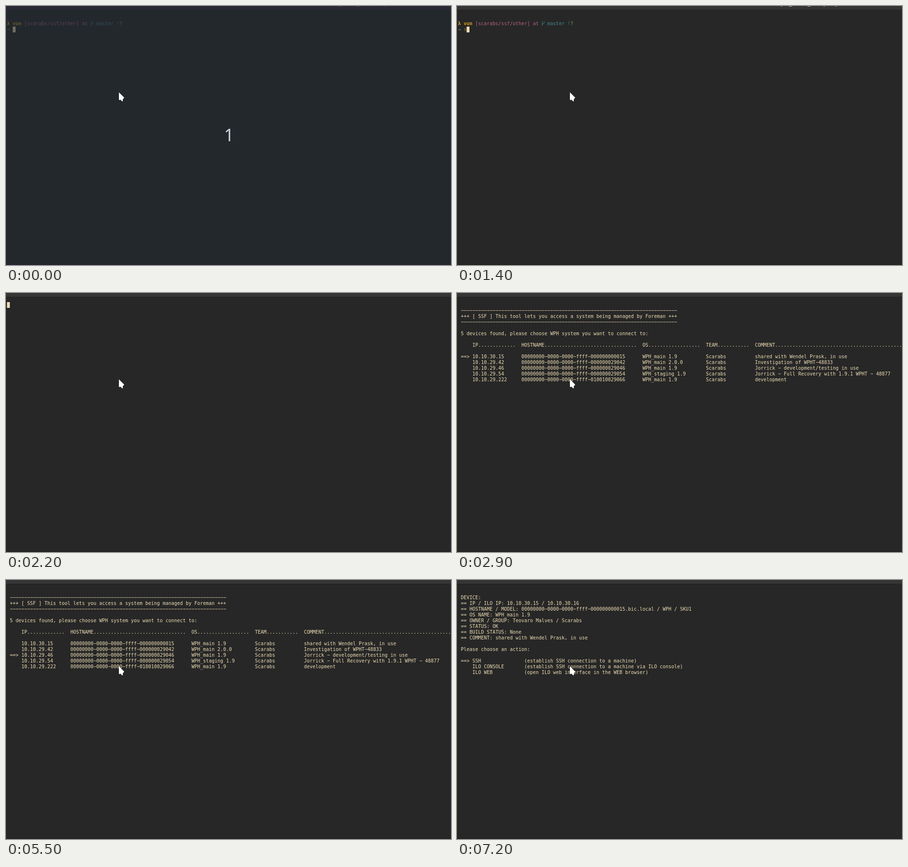
These frames come from a looping animation (926x540 px, 8 s). An HTML page:

```html
<!DOCTYPE html>
<html lang="en">
<head>
<meta charset="utf-8">
<title>Terminal session</title>
<style>
html, body { margin: 0; width: 100%; height: 100%; overflow: hidden; background: #272727; }
svg { display: block; width: 926px; height: 540px; }
text {
  font: 10px "DejaVu Sans Mono", monospace;
  white-space: pre;
  fill: #ebdbb2;
}
.gold { fill: #d79921; font-weight: bold; }
.purple { fill: #b16286; }
.blue { fill: #458588; }
.aqua { fill: #689d6a; }
.typed { fill: #88703a; }
.count { font: 36px "Noto Sans", sans-serif; fill: #cbd8da; text-anchor: middle; }

/* Every part shares one 8 s clock with hard changes. */
.part { animation: 8s step-end infinite; }
#fade { animation-name: fade; }
#title { animation-name: title; }
#shell { animation-name: shell; }
#cursor { animation-name: cursor; }
#list { animation-name: list; }
#device { animation-name: device; }
#arrow { animation-name: arrow; }
#key1 { animation-name: key1; }
#key2 { animation-name: key2; }
#key3 { animation-name: key3; }

@keyframes fade { 0% { opacity: 1 } 1.25%, 100% { opacity: 0 } }
@keyframes title { 0% { opacity: 1 } 25%, 100% { opacity: 0 } }
@keyframes shell { 0% { opacity: 1 } 27.5%, 100% { opacity: 0 } }
@keyframes list { 0% { opacity: 0 } 36.25% { opacity: 1 } 90%, 100% { opacity: 0 } }
@keyframes device { 0% { opacity: 0 } 90%, 100% { opacity: 1 } }
@keyframes key1 { 0% { opacity: 0 } 17.5%, 100% { opacity: 1 } }
@keyframes key2 { 0% { opacity: 0 } 20%, 100% { opacity: 1 } }
@keyframes key3 { 0% { opacity: 0 } 23.75%, 100% { opacity: 1 } }
@keyframes cursor {
  0% { transform: translate(14px, 43px); opacity: 1 }
  17.5% { transform: translate(20px, 43px); opacity: 1 }
  20% { transform: translate(26px, 43px); opacity: 1 }
  23.75% { transform: translate(32px, 43px); opacity: 1 }
  25% { transform: translate(2px, 55px); opacity: 1 }
  27.5% { transform: translate(2px, 19px); opacity: 1 }
  36.25%, 100% { transform: translate(2px, 19px); opacity: 0 }
}
@keyframes arrow {
  0% { transform: translateY(0) }
  60% { transform: translateY(48px) }
  62.5% { transform: translateY(36px) }
  63.75% { transform: translateY(24px) }
  66.25% { transform: translateY(12px) }
  68.75% { transform: translateY(24px) }
  71.25% { transform: translateY(36px) }
  72.5% { transform: translateY(48px) }
  75%, 100% { transform: translateY(0) }
}
</style>
</head>
<body>
<svg viewBox="0 0 926 540">
  <rect width="926" height="540" fill="#272727"/>
  <rect width="926" height="8" fill="#353535"/>
  <rect y="8" width="926" height="1" fill="#1f1f1f"/>
  <rect y="538" width="926" height="2" fill="#212121"/>

  <!-- lower edge of the cropped window title -->
  <path id="title" class="part" fill="none" stroke="#dedede" stroke-width="1.6"
    d="M673 -1L676 .5M689 -1Q694 1.5 699 -1M728 -1Q732 1.5 737 -1M762 -1L765 .5M791 -1L788 .5"/>

  <g id="shell" class="part">
    <path d="M177.5 32V41M181.5 32V35L178 38" fill="none" stroke="#458588"/>
  </g>
  <rect id="cursor" class="part" width="6" height="12" fill="#ebdbb2"/>

  <g id="list" class="part"><g id="arrow" class="part"></g></g>
  <g id="device" class="part"></g>

  <g id="fade" class="part">
    <rect width="926" height="540" fill="#232a33" opacity=".62"/>
    <path d="M0 0H926V8H0ZM0 538H926V540H0Z" fill="#30203c" opacity=".3"/>
    <text class="count" x="464" y="282">1</text>
  </g>
  <path d="M235 180V196L238.5 195.5L242 199L243 198.5V194.5L246 191Z" fill="#fff"/>
</svg>
<script>
const svgNS = "http://www.w3.org/2000/svg";
const cellWidth = 6, rowHeight = 12, firstBaseline = 40;

// Prints on the terminal grid: one glyph per cell, with the wide dash.
function print(parent, string, x, row, className = "") {
  const text = document.createElementNS(svgNS, "text");
  text.setAttribute("class", className);
  text.setAttribute("x", [...string].map((_, i) => x + cellWidth * i).join(" "));
  text.setAttribute("y", firstBaseline + rowHeight * row);
  text.textContent = string.replaceAll("-", "−");
  document.getElementById(parent).append(text);
  return text;
}

const printLines = (parent, lines) =>
  lines.forEach((line, row) => line && print(parent, line, 8, row));

print("shell", "λ vun", 2, 0, "gold");
print("shell", "[scarabs/ssf/other] at", 38, 0, "purple");
print("shell", "master !", 188, 0, "blue");
print("shell", "?", 236, 0, "aqua");
print("shell", "→", 2, 1, "aqua");
[..."ssf"].forEach((key, i) => {
  print("shell", key, 14 + cellWidth * i, 1, "typed part").id = "key" + (i + 1);
});
print("arrow", "==>", 8, 8);

const widths = [15, 40, 20, 15, 52];
const row = (cells, pad = " ") =>
  "    " + cells.map((cell, i) => cell.padEnd(widths[i], pad)).join("  ");
const device = (ip, id, os, comment) =>
  row([ip, "00000000-0000-0000-ffff-" + id, os, "Scarabs", comment]);
const rule = "-".repeat(75);

printLines("list", [
  rule,
  "+++ [ SSF ] This tool lets you access a system being managed by Foreman +++",
  rule,
  "",
  "5 devices found, please choose WPH system you want to connect to:",
  "",
  row(["IP", "HOSTNAME", "OS", "TEAM", "COMMENT"], "."),
  "",
  device("10.10.30.15", "000000000015", "WPH_main 1.9", "shared with Wendel Prask, in use"),
  device("10.10.29.42", "000000029042", "WPH_main 2.0.0", "Investigation of WPHT-48833"),
  device("10.10.29.46", "000000029046", "WPH_main 1.9", "Jorrick - development/testing in use"),
  device("10.10.29.54", "000000029054", "WPH_staging 1.9", "Jorrick - Full Recovery with 1.9.1 WPHT - 48877"),
  device("10.10.29.222", "010010029066", "WPH_main 1.9", "development"),
]);

const action = (mark, name, note) => mark.padEnd(4) + name.padEnd(18) + `(${note})`;

printLines("device", [
  "DEVICE:",
  "== IP / ILO IP: 10.10.30.15 / 10.10.30.16",
  "== HOSTNAME / MODEL: 00000000-0000-0000-ffff-000000000015.bic.local / WPH / SKU1",
  "== OS NAME: WPH_main 1.9",
  "== OWNER / GROUP: Teovaro Malves / Scarabs",
  "== STATUS: OK",
  "== BUILD STATUS: None",
  "== COMMENT: shared with Wendel Prask, in use",
  "",
  "Please choose an action:",
  "",
  action("==>", "SSH", "establish SSH connection to a machine"),
  action("", "ILO CONSOLE", "establish SSH connection to a machine via ILO console"),
  action("", "ILO WEB", "open ILO web interface in the WEB browser"),
]);
</script>
</body>
</html>
```
